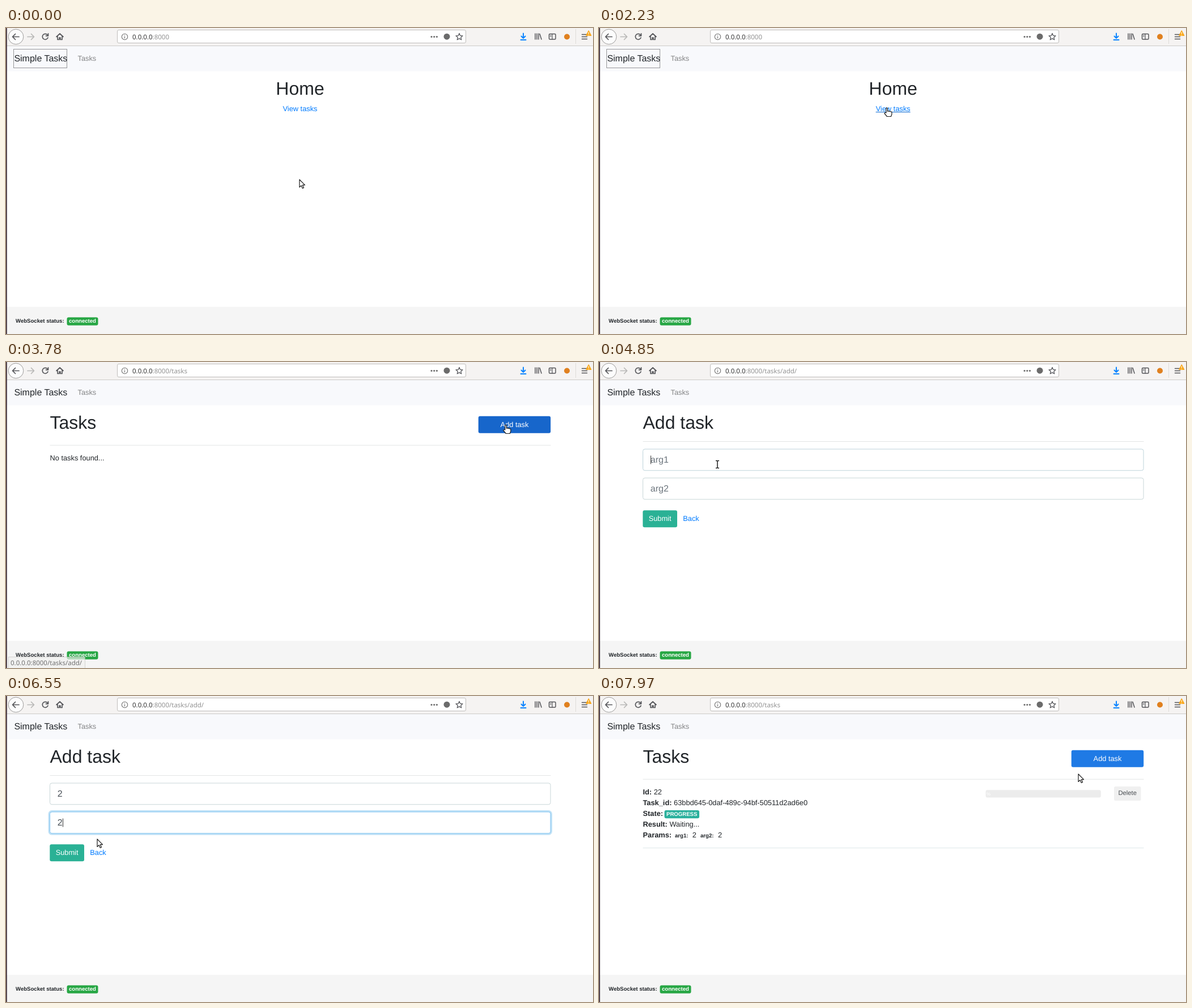
Write an HTML page that moves like this. It is 1036x541 px and loops after 8000 ms.

```html
<!DOCTYPE html>
<html lang="en">
<head>
<meta charset="utf-8">
<title>Simple Tasks</title>
<style>
  html, body { margin: 0; width: 100%; height: 100%; overflow: hidden; background: #fff; }
  svg { display: block; width: 100vw; height: 100vh; }
  text { font: 12.8px "Liberation Sans", Arial, sans-serif; fill: #212529; text-rendering: geometricPrecision; white-space: pre; }
  .h1 { font-size: 32px; }
  .brand { font-size: 16px; }
  .b, .tag { font-weight: bold; }
  .tag { font-size: 9.6px; }
  .ui { font: 11.5px "Noto Sans", "Open Sans", sans-serif; fill: #333; }
  .field { font-size: 16px; fill: #6c757d; }
  .mid { text-anchor: middle; }
  .link { fill: #007bff; }
  .white { fill: #fff; }
  .icon { fill: none; stroke: #55565a; stroke-width: 1.7; stroke-linecap: round; stroke-linejoin: round; }
  .cursor path { fill: #fff; stroke: #1c1c1c; stroke-width: 1.2; stroke-linejoin: round; }
</style>
</head>
<body>
<svg viewBox="0 0 1036 541" preserveAspectRatio="none">
  <rect width="1036" height="541" fill="#fff"/>

  <!-- browser bar -->
  <rect width="1036" height="31" fill="#f5f3f2"/>
  <rect y="31" width="1036" height="1" fill="#cccac8"/>
  <circle cx="17.5" cy="15.5" r="13.3" fill="#fcfcfc" stroke="#9b9a99"/>
  <g class="icon">
    <path d="M23 15.5H12M16.5 10.5l-5 5 5 5"/>
    <path d="M38 15.5h11M44.500 10.5l5 5-5 5" stroke="#b9b8b7"/>
    <path d="M73.200 12.200A5 5 0 1 0 74 17M74.500 9.800v4h-4"/>
    <path d="M89 15.500l6-5.500 6 5.500M91 15v5.500h3v-3.500h2v3.500h3V15"/>
  </g>
  <rect x="196.500" y="3.500" width="615" height="23" rx="2.500" fill="#fff" stroke="#bfbdbb"/>
  <g class="icon" style="stroke-width:1.100;stroke:#707070">
    <circle cx="209.500" cy="15.500" r="5.200"/>
    <path d="M209.500 15v3M209.500 12.700v.2"/>
  </g>
  <text class="ui" x="223" y="20">0.0.0.0<tspan id="url" fill="#929292"></tspan></text>
  <g fill="#6b6b6b">
    <circle cx="751" cy="15.500" r="1.600"/><circle cx="755.700" cy="15.500" r="1.600"/><circle cx="760.400" cy="15.500" r="1.600"/>
    <circle cx="778" cy="15.200" r="5.500"/>
  </g>
  <path id="star" class="icon" style="stroke-width:1.300"/>
  <g class="icon" style="stroke-width:1.500">
    <path d="M913 9.500v8M909.500 14.500l3.500 3.500 3.500-3.500M908.500 21h9" stroke="#0a84ff" stroke-width="2"/>
    <path d="M934 10v10M937 10v10M940 10v10M942 10.500l3 9.500"/>
    <rect x="958.500" y="10.500" width="11.500" height="9.500" rx="1.500"/>
    <path d="M964 10.500v9.500M960.500 13h1.500M960.500 15h1.500" stroke-width="1.200"/>
    <path d="M1016.500 11.500h9M1016.500 15.500h9M1016.500 19.500h9"/>
  </g>
  <circle cx="990" cy="15.500" r="5" fill="#e0801f"/>
  <path d="M1005.500 2v26" stroke="#dddbd9"/>
  <path d="M1028.300 4.500l4.700 9h-9.400z" fill="#f9a81c" stroke="#f9a81c" stroke-linejoin="round"/>
  <path d="M1028.300 7.500v3M1028.300 12v1" stroke="#fff" stroke-width="1.200"/>

  <!-- page frame -->
  <rect y="32" width="1036" height="44.500" fill="#f8f9fc"/>
  <text class="brand" x="14.400" y="59">Simple Tasks</text>
  <rect id="outline" x="13.500" y="37.500" width="94" height="33" fill="none" stroke="#333" stroke-dasharray="1 1"/>
  <text x="126.500" y="58.300" style="fill:#848586">Tasks</text>
  <rect y="493" width="1036" height="48" fill="#f5f5f5"/>
  <text class="tag" x="17" y="521">WebSocket status:</text>
  <rect x="107.500" y="511.500" width="55" height="14.300" rx="3" fill="#28a745"/>
  <text class="tag white mid" x="135" y="521">connected</text>

  <g id="home">
    <text class="h1 mid" x="519" y="117.500">Home</text>
    <text class="link mid" x="519" y="147">View tasks</text>
    <path id="underline" d="M488.500 148.700h61" stroke="#0062cc"/>
  </g>

  <g id="tasks">
    <text class="h1" x="77.500" y="117.500">Tasks</text>
    <rect id="addBtn" x="833.700" y="95.700" width="127.500" height="30" rx="3"/>
    <text class="white mid" x="897.500" y="115">Add task</text>
    <path d="M77.500 147.200h884" stroke="#e3e5e5"/>
    <text id="empty" x="77.500" y="174">No tasks found...</text>
    <g id="list">
      <text x="77.500" y="174"><tspan class="b">Id:</tspan> 22</text>
      <text x="77.500" y="193"><tspan class="b">Task_id:</tspan> 63bbd645-0daf-489c-94bf-50511d2ad6e0</text>
      <text class="b" x="77.500" y="212">State:</text>
      <rect x="115.500" y="202" width="61.500" height="14.300" rx="3" fill="#2ab09c"/>
      <text class="tag white mid" x="146.200" y="212">PROGRESS</text>
      <text x="77.500" y="231"><tspan class="b">Result:</tspan> Waiting...</text>
      <text class="b" x="77.500" y="250">Params:</text>
      <text class="tag" x="134" y="250">arg1:</text><text x="164.800" y="250">2</text>
      <text class="tag" x="179" y="250">arg2:</text><text x="210" y="250">2</text>
      <path d="M77.500 268.700h884" stroke="#dce7e9"/>
      <rect x="682.500" y="166.200" width="203.300" height="13.300" rx="3" fill="#ececec"/>
      <text class="white" x="684" y="175.500" style="font-size:8px">%</text>
      <rect x="909" y="160" width="47.500" height="25" rx="2.500" fill="#f0f0f0"/>
      <text class="mid" x="932.700" y="175.300" style="font-size:11.2px;fill:#484c50">Delete</text>
    </g>
  </g>

  <g id="form">
    <text class="h1" x="77.500" y="117.500">Add task</text>
    <path d="M77.500 140.500h884" stroke="#e3e5e5"/>
    <g id="fields"></g>
    <rect id="submitRing" x="75.800" y="261" width="63.500" height="32.500" rx="4" fill="none" stroke="#85cdd6" stroke-width="3"/>
    <rect id="submitBtn" x="77.300" y="262.300" width="60.700" height="30" rx="3"/>
    <text class="white mid" x="107.600" y="281">Submit</text>
    <text class="link" x="148.300" y="281">Back</text>
  </g>

  <g id="tip">
    <rect id="tipBox" x="4.500" y="521.500" height="20" fill="#f2f1f0" stroke="#c4c2c0"/>
    <text id="tipText" class="ui" x="8" y="536"></text>
  </g>
  <rect width="1.700" height="541" fill="#3b2a35"/>

  <g id="cursor" class="cursor">
    <path id="arrow" d="M0 0V13.500L3.100 10.600 5.300 15.500 7.500 14.500 5.400 9.700H9.500Z"/>
    <path id="hand" d="M-1.200 9V1.200Q0 -.8 1.300 1.200V6.300Q2.700 5 3.900 6.500 5.300 5.500 6.400 7 8.600 6.200 8.800 8.500V11.500L7.300 15.500H.3L-4.200 10Q-3.600 7.600 -1.200 9Z"/>
    <g id="beam" fill="none">
      <path d="M-3 -6.500H-1L0 -5.800 1 -6.500H3M0 -5.800V5.800M-3 6.500H-1L0 5.800 1 6.500H3" style="fill:none;stroke:#fff;stroke-width:3"/>
      <path d="M-3 -6.500H-1L0 -5.800 1 -6.500H3M0 -5.800V5.800M-3 6.500H-1L0 5.800 1 6.500H3" style="fill:none;stroke-width:1.500"/>
    </g>
  </g>
</svg>
<script>
const LOOP = 8000;
const $ = id => document.getElementById(id);
const show = (id, on) => { $(id).style.display = on ? '' : 'none'; };
const clamp = v => Math.max(0, Math.min(1, v));
const ramp = (t, from, ms) => clamp((t - from) / ms);
const smooth = p => p * p * (3 - 2 * p);
const within = (t, from, to) => t >= from && t < to;
const mix = (a, b, p) => `rgb(${a.map((v, i) => Math.round(v + (b[i] - v) * p))})`;

// Moments of the session
const OPEN_TASKS = 2620, OPEN_FORM = 3930, OPEN_LIST = 7060;
const PRESS = 6850, RING = 130;
const FIELDS = [
  { y: 154, label: 'arg1', focus: 4850, typed: 5430, blur: 6040 },
  { y: 205, label: 'arg2', focus: 6040, typed: 6440, blur: PRESS }
];

// Pointer track: time, x, y
const TRACK = [
  [0, 518, 268], [1469, 518, 268], [1470, 519, 266], [2270, 507.5, 140],
  [2900, 507.5, 140], [3680, 884, 111], [3890, 880, 112], [4520, 236, 178],
  [4850, 209, 181], [5600, 209, 181], [6050, 196.5, 228], [6240, 194, 231],
  [6840, 131, 273], [7320, 131, 273], [7980, 846, 138], [LOOP, 846, 138]
];

function pointer(t) {
  const i = TRACK.findIndex(k => k[0] > t);
  const [a, b] = [TRACK[i - 1], TRACK[i]];
  const p = smooth((t - a[0]) / (b[0] - a[0]));
  return [1, 2].map(n => a[n] + (b[n] - a[n]) * p);
}

$('star').setAttribute('d', 'M' + Array.from({ length: 10 }, (_, i) => {
  const a = i * Math.PI / 5 - Math.PI / 2, r = i % 2 ? 2.9 : 6.3;
  return `${(800 + r * Math.cos(a)).toFixed(1)} ${(15.7 + r * Math.sin(a)).toFixed(1)}`;
}).join('L') + 'Z');

$('fields').innerHTML = FIELDS.map(({ y }, i) => `
  <rect id="ring${i}" fill="none" stroke="#bfe1f6"/>
  <rect id="box${i}" x="77.500" y="${y}" width="883.500" height="37.800" rx="3.500" fill="#fff"/>
  <text id="value${i}" class="field" x="90.800" y="${y + 24}"></text>
  <path id="caret${i}" stroke="#333"/>`).join('');

function drawField(f, i, t) {
  const p = smooth(ramp(t, f.focus - 10, RING)) * (1 - smooth(ramp(t, f.blur, RING)));
  const ring = $('ring' + i), w = 3 * p, typed = t >= f.typed;
  const edge = { x: 77.5 - w / 2, y: f.y - w / 2, width: 883.5 + w, height: 37.8 + w, rx: 3.5 + w / 2, 'stroke-width': w };
  for (const k in edge) ring.setAttribute(k, edge[k]);
  $('box' + i).setAttribute('stroke', mix([200, 214, 216], [128, 195, 240], Math.sqrt(p)));
  $('value' + i).textContent = typed ? '2' : f.label;
  $('value' + i).style.fill = typed ? '#495057' : '#6c757d';
  $('caret' + i).setAttribute('d', `M${typed ? 100.5 : 91.5} ${f.y + 11.5}v15`);
  show('caret' + i, within(t, f.focus, f.blur));
}

function drawTip(t) {
  const onForm = t > 3000;
  const [from, to] = onForm ? [3720, OPEN_FORM] : [2370, OPEN_TASKS];
  $('tip').setAttribute('opacity', ramp(t, from, 90) * (1 - ramp(t, to, 110)));
  $('tipText').textContent = '0.0.0.0:8000/tasks' + (onForm ? '/add/' : '');
  $('tipBox').setAttribute('width', onForm ? 135 : 105);
}

function draw(t) {
  const home = t < OPEN_TASKS, form = within(t, OPEN_FORM, OPEN_LIST), list = t >= OPEN_LIST;
  const tasks = !home && !form;
  show('home', home);
  show('tasks', tasks);
  show('form', form);
  show('empty', !list);
  show('list', list);
  show('outline', t < 2540);
  $('url').textContent = ':8000' + (home ? '' : form ? '/tasks/add/' : '/tasks');

  const [x, y] = pointer(t);
  const over = (l, top, r, bottom) => x >= l && x <= r && y >= top && y <= bottom;
  const onLink = home && over(488, 134, 550, 152);
  const onAdd = tasks && over(834, 96, 961, 126);
  const onField = form && FIELDS.some(f => over(77, f.y, 961, f.y + 38));
  const onSubmit = form && over(77, 262, 138, 292);

  show('underline', onLink);
  $('addBtn').setAttribute('fill', onAdd ? '#1766cb' : '#1f7ae5');
  FIELDS.forEach((f, i) => drawField(f, i, t));
  const press = smooth(ramp(t, PRESS, RING));
  const base = onSubmit ? [33, 145, 150] : [42, 177, 149];
  $('submitBtn').setAttribute('fill', mix(base, [41, 91, 162], press));
  $('submitRing').setAttribute('opacity', press);
  drawTip(t);

  $('cursor').setAttribute('transform', `translate(${Math.round(x)} ${Math.round(y)})`);
  show('hand', onLink || onAdd);
  show('beam', onField);
  show('arrow', !(onLink || onAdd || onField));
  $('arrow').style.fill = onSubmit ? '#111' : '#fff';
  $('arrow').style.stroke = onSubmit ? '#fff' : '#1c1c1c';
}

const start = performance.now();
function tick() {
  draw((performance.now() - start) % LOOP);
  requestAnimationFrame(tick);
}
tick();
</script>
</body>
</html>
```
